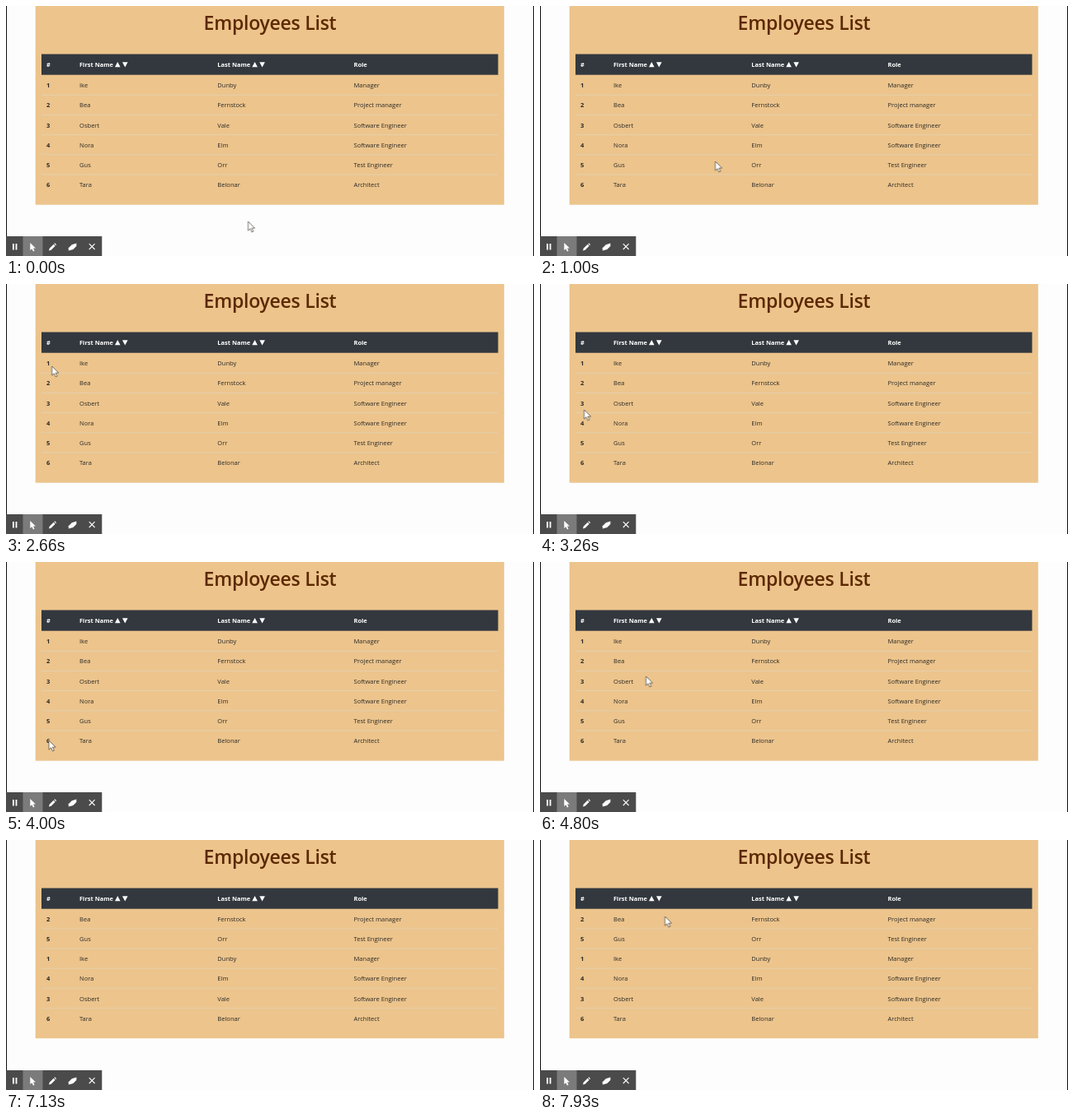
Recreate the animation shown at these times as an HTML page. Size 640 by 304 pixels, loop 8 s.

```html
<!DOCTYPE html>
<html lang="en">
<head>
<meta charset="utf-8">
<title>Employees List</title>
<style>
  html, body { margin: 0; width: 100%; height: 100%; overflow: hidden; background: #fdfdfd; }
  svg { display: block; width: 640px; height: 304px; }
  text { font-family: "Open Sans", "Noto Sans", sans-serif; font-size: 7.57px; fill: #2d2a26; }
  .title { font-size: 23px; font-weight: 600; letter-spacing: -.25px; fill: #5c2800; text-anchor: middle; }
  .head text { font-size: 7.47px; font-weight: 700; fill: #fff; }
  .head path { fill: #fff; }
  .id { font-weight: 700; }
  .lines { stroke: #e6d3b1; stroke-width: .9; }

  .row, .panel, .lines, .ring, .pointer { animation: 8s linear infinite; }

  /* --a and --b are the row's slots before and after sorting */
  .row { animation-name: sort; }
  @keyframes sort {
    0%, 80.74% { transform: translateY(calc(var(--a) * 24.2px)); }
    80.75%, 100% { transform: translateY(calc(var(--b) * 24.2px - .4px)); }
  }
  .panel { animation-name: shrink; }
  @keyframes shrink {
    0%, 80.74% { height: 241.7px; }
    80.75%, 100% { height: 241.2px; }
  }
  .lines { animation-name: lift; }
  @keyframes lift {
    0%, 80.74% { transform: translateY(0); }
    80.75%, 100% { transform: translateY(-.4px); }
  }

  .ring { fill: none; stroke: #c4161c; stroke-width: 1.6; opacity: 0; animation-name: click; }
  @keyframes click {
    0%, 76.6% { r: 9px; opacity: 0; }
    76.62% { r: 9px; opacity: .5; }
    79.1%, 80.7% { r: 16px; opacity: .8; }
    82.5%, 100% { r: 16px; opacity: 0; }
  }

  .pointer {
    fill: #fff; stroke: #55504a; stroke-width: .8; stroke-linejoin: round;
    animation-name: move, hide;
    animation-timing-function: ease-in-out, step-end;
  }
  @keyframes move {
    0%, .75% { transform: translate(293.5px, 262px); }
    7.5%, 12.5% { transform: translate(212.5px, 189px); }
    22.5%, 23.25% { transform: translate(136.5px, 97px); }
    27.5%, 30.75% { transform: translate(56px, 92px); }
    40.75%, 41.6% { transform: translate(53.5px, 153px); }
    48.25%, 50% { transform: translate(52px, 217px); }
    52.5%, 56.6% { transform: translate(58px, 219px); }
    60%, 63.25% { transform: translate(128.5px, 139px); }
    68.25%, 95.75% { transform: translate(134.5px, 74px); }
    99.1%, 100% { transform: translate(151.5px, 93px); }
  }
  @keyframes hide {
    0% { opacity: 1; }
    67.2% { opacity: 0; }
    97.5%, 100% { opacity: 1; }
  }
</style>
</head>
<body>
<svg viewBox="0 0 640 304">
  <path d="M.5 0V304M639.5 0V304" stroke="#111"/>
  <rect class="panel" x="35.7" width="568.1" height="241.7" fill="#ecc48c"/>
  <text class="title" x="320" y="29">Employees List</text>

  <g class="lines"><path id="rules"/></g>
  <g class="head">
    <rect x="43" y="58.5" width="553.5" height="25.2" fill="#32383e"/>
    <text x="49" y="74">#</text>
    <text x="89" y="74">First Name</text>
    <text x="256.3" y="74">Last Name</text>
    <text x="421.5" y="74">Role</text>
    <path id="arrows" d="M132 74.3h6.6l-3.3-6.3zM141 68.2h6.6l-3.3 6.3z"/>
    <use href="#arrows" x="166.3"/>
  </g>
  <g id="rows"></g>

  <g>
    <rect y="280" width="116.3" height="24" fill="#4b4b4b"/>
    <rect x="20.5" y="280" width="24" height="24" fill="#7b7b7b"/>
    <g fill="#fff">
      <path d="M8 289h1.8v7.6H8zM11.6 289h1.8v7.6h-1.8z"/>
      <path d="M29.3 288v9l2.1-1.8 1.6 3.2 1.5-.7-1.5-3.2h2.9z"/>
      <path d="M52 297.4l.7-2.7 5-5 2 2-5 5zM58.3 289.1l.9-.9 2 2-.9.9z"/>
      <path d="M75.8 294.2l4-4 5.6-1.6v3.4l-4 4-5.6 1.6z"/>
    </g>
    <path d="M100.8 289.2l6.8 6.8M107.6 289.2l-6.8 6.8" stroke="#fff" stroke-width="1.1"/>
  </g>

  <circle class="ring" cx="134.6" cy="73.8" r="16"/>
  <path class="pointer" d="M0 0v11.2l2.6-2.4 1.9 4.2 1.9-.9-1.9-4h3.6z"/>
</svg>
<script>
  const people = [
    ["Ike", "Dunby", "Manager"],
    ["Bea", "Fernstock", "Project manager"],
    ["Osbert", "Vale", "Software Engineer"],
    ["Nora", "Elm", "Software Engineer"],
    ["Gus", "Orr", "Test Engineer"],
    ["Tara", "Belonar", "Architect"]
  ];
  const columns = [49, 89, 256.3, 421.5];
  const sorted = [...people].sort((p, q) => p[0] < q[0] ? -1 : 1);

  const cell = (text, i) =>
    `<text x="${columns[i]}" y="99.2"${i ? "" : ' class="id"'}>${text}</text>`;

  document.getElementById("rows").innerHTML = people.map((person, i) =>
    `<g class="row" style="--a:${i};--b:${sorted.indexOf(person)}">` +
    [i + 1, ...person].map(cell).join("") + "</g>"
  ).join("");

  document.getElementById("rules").setAttribute("d",
    [1, 2, 3, 4, 5].map(i => `M43 ${(84 + i * 24.2).toFixed(1)}H596.5`).join(""));
</script>
</body>
</html>
```
